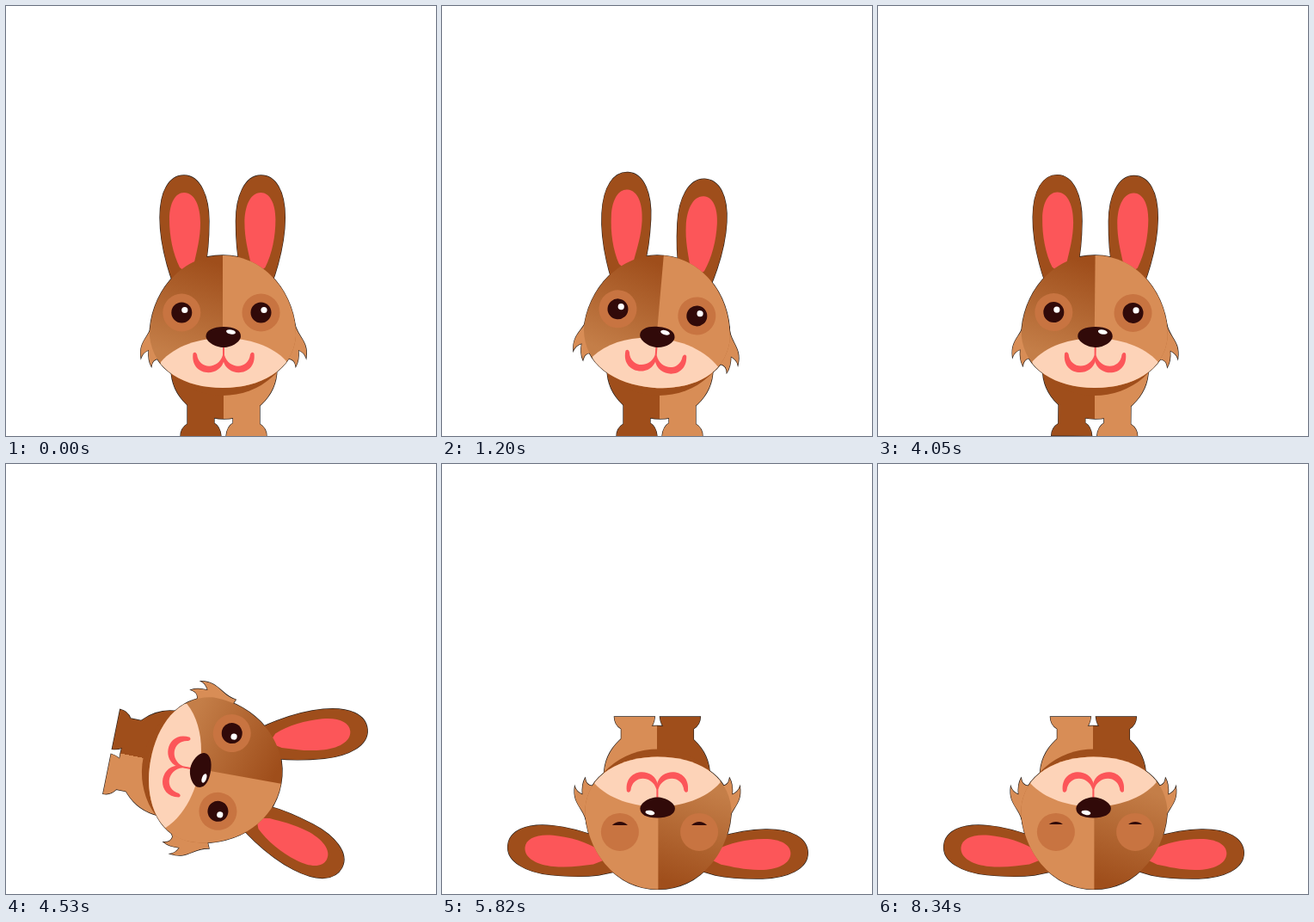
Write an HTML page with a canvas that moves like this. It is 500 px wide and 500 px high and loops after 9000 ms.

```html
<!DOCTYPE html>
<html lang="en">
<head>
<meta charset="utf-8">
<title>Rabbit</title>
<style>
html, body { margin: 0; width: 100%; height: 100%; overflow: hidden; background: #fff; }
canvas { display: block; width: 500px; height: 500px; }
</style>
</head>
<body>
<canvas id="stage" width="500" height="500"></canvas>
<script>
const ctx = document.getElementById('stage').getContext('2d');
const LOOP = 9000, STEP = 30;
const DARK = '#9f4e1b', LIGHT = '#d88d56', PATCH = '#c87441';
const PINK = '#fc5659', CREAM = '#fdd3b8', INK = '#310a09';
const NECK = [251.7, 356.5], PIVOT = [251.7, 359.2];
const AXIS = 253;

const smooth = u => u * u * (3 - 2 * u);
const cubic = u => u < 0.5 ? 4 * u ** 3 : 1 - 4 * (1 - u) ** 3;

// Eased value at time t along a list of [time, value] keys.
function track(t, keys, ease = smooth) {
  if (t <= keys[0][0]) return keys[0][1];
  for (let i = 1; i < keys.length; i++) {
    const [a, from] = keys[i - 1], [b, to] = keys[i];
    if (t < b) return from + (to - from) * ease((t - a) / (b - a));
  }
  return keys[keys.length - 1][1];
}

function ellipsePath(x, y, rx, ry) {
  const p = new Path2D();
  p.ellipse(x, y, rx, ry, 0, 0, Math.PI * 2);
  return p;
}

const ear = new Path2D('M201 338 C194 324 179 284 179 246 C179 215 190 197 207 197 C226 197 236 222 236 250 C236 275 234 292 231 305 L222 334 Z');
const earInner = new Path2D('M202 304 C194 288 190 268 190 248 C190 229 197 217 207 217 C220 217 226 234 226 252 C226 270 222 284 219 298 L212 312 Z');
const fur = new Path2D('M171 366 C169 384 154 388 157 409 Q159 403 166 400 Q165 412 169 419 Q170 411 177 410 Q182 413 190 416 L192 375 Z');
const head = new Path2D('M252 290 C303 290 337 337 337 384 C334 424 295 444 252 444 C208 444 171 424 167 384 C167 337 201 290 252 290 Z');
const muzzle = new Path2D('M180 414 C212 377 293 377 326 413 V450 H180 Z');
const mouth = new Path2D('M217.500 404 C214 431 249 433 253.500 412 L253.500 395 L252 395 L252 406 C247 423 224 423 222 405 Q220 401 217.500 404 Z');
const nose = new Path2D('M253 373 C266 373 273 377 273 384 C273 390 263 397 253 397 C243 397 232.500 390 232.500 384 C232.500 377 241 373 253 373 Z');
const leg = new Path2D('M211 450 V486 Q203 491 203 500 H250 Q249 489 242 485 V450 Z');
const belly = ellipsePath(AXIS + 0.5, 422, 61.5, 58);
const chinShade = ellipsePath(252, 380, 81, 73);

const coat = ctx.createLinearGradient(242, 298, 206, 410);
coat.addColorStop(0, DARK);
coat.addColorStop(1, '#c47e48');
const halves = ctx.createLinearGradient(AXIS - 1, 0, AXIS + 1, 0);
halves.addColorStop(0, DARK);
halves.addColorStop(0.5, DARK);
halves.addColorStop(0.5, LIGHT);
halves.addColorStop(1, LIGHT);

let edging = false;

// A part of the silhouette: thin dark rim first, colour later.
function part(path, color) {
  if (edging) {
    ctx.stroke(path);
  } else {
    ctx.fillStyle = color;
    ctx.fill(path);
  }
}

function fill(path, color) {
  if (edging) return;
  ctx.fillStyle = color;
  ctx.fill(path);
}

function group(draw) {
  ctx.save();
  draw();
  ctx.restore();
}

function spin(deg, x, y) {
  ctx.translate(x, y);
  ctx.rotate(deg * Math.PI / 180);
  ctx.translate(-x, -y);
}

function mirror(axis) {
  ctx.translate(2 * axis, 0);
  ctx.scale(-1, 1);
}

function drawEar(turn, x) {
  spin(turn, x, 328);
  part(ear, DARK);
  fill(earInner, PINK);
}

function drawEars(pose) {
  group(() => drawEar(-pose.spread - pose.tilt * 0.4, 209));
  group(() => {
    mirror(251.7);
    drawEar(-pose.spread * 1.05 + pose.tilt * 0.4, 207);
  });
}

function drawBody(pose) {
  for (const side of [0, 1]) {
    group(() => {
      ctx.translate(0, pose.feet);
      if (side) mirror(AXIS);
      part(leg, side ? LIGHT : DARK);
    });
  }
  group(() => {
    ctx.translate(AXIS, 0);
    ctx.scale(1 + pose.breath * 0.04, 1);
    ctx.translate(-AXIS, 0);
    part(belly, halves);
    ctx.clip(belly);
    fill(chinShade, DARK);
  });
}

function drawEye(x, lid) {
  const y = 356.5;
  fill(ellipsePath(x, y, 22, 22), PATCH);
  group(() => {
    ctx.beginPath();
    ctx.rect(x - 14, y + lid, 28, 30);
    ctx.clip();
    fill(ellipsePath(x, y, 12, 12), INK);
    fill(ellipsePath(x + 3.5, y - 3, 3.6, 3.6), '#fff');
  });
}

function drawHead(pose) {
  for (const side of [0, 1]) {
    group(() => {
      if (side) mirror(AXIS);
      ctx.translate(-6 * pose.flare, -7 * pose.flare);
      part(fur, LIGHT);
    });
  }
  part(head, coat);
  if (edging) return;
  group(() => {
    ctx.beginPath();
    ctx.rect(252, 280, 100, 180);
    ctx.clip();
    fill(head, LIGHT);
  });
  group(() => {
    ctx.clip(head);
    fill(muzzle, CREAM);
  });
  drawEye(204.3, pose.lid);
  drawEye(296.5, pose.lid);
  for (const side of [0, 1]) {
    group(() => {
      if (side) mirror(AXIS);
      fill(mouth, PINK);
    });
  }
  fill(nose, INK);
  group(() => {
    spin(10, 261.5, 379);
    fill(ellipsePath(261.5, 379, 5.5, 2.6), '#fff');
  });
}

function poseAt(t) {
  const breath = track(t, [[6750, 0], [7270, 1], [8340, 0]]);
  return {
    breath,
    flare: breath + track(t, [[4020, 0], [4500, 1], [4980, 0]]),
    tilt: track(t, [[300, 0], [600, -5], [1200, 5], [1800, -5], [2130, 0], [4020, 0], [4500, -1.3], [4980, 0]]),
    turn: track(t, [[4020, 0], [4960, 180]]),
    drop: track(t, [[4950, 0], [5285, 66]]),
    spread: track(t, [[4020, 0], [4200, -4], [5080, 91]], cubic) + 5 * breath,
    feet: track(t, [[4020, 0], [4450, -9.5]]) + 12 * breath,
    lid: track(t, [[5460, -13], [5880, 9]])
  };
}

function drawRabbit(pose) {
  group(() => {
    ctx.translate(0, pose.drop);
    spin(pose.turn, ...PIVOT);
    group(() => {
      spin(pose.tilt, ...NECK);
      drawEars(pose);
    });
    drawBody(pose);
    group(() => {
      spin(pose.tilt, ...NECK);
      drawHead(pose);
    });
  });
}

function render(t) {
  const pose = poseAt(t);
  ctx.fillStyle = '#fff';
  ctx.fillRect(0, 0, 500, 500);
  ctx.strokeStyle = '#2b211c';
  ctx.lineWidth = 1.3;
  for (edging of [true, false]) drawRabbit(pose);
}

const start = performance.now();
function loop() {
  const t = (performance.now() - start) % LOOP;
  render(Math.floor(t / STEP) * STEP);
  requestAnimationFrame(loop);
}
loop();
</script>
</body>
</html>
```
